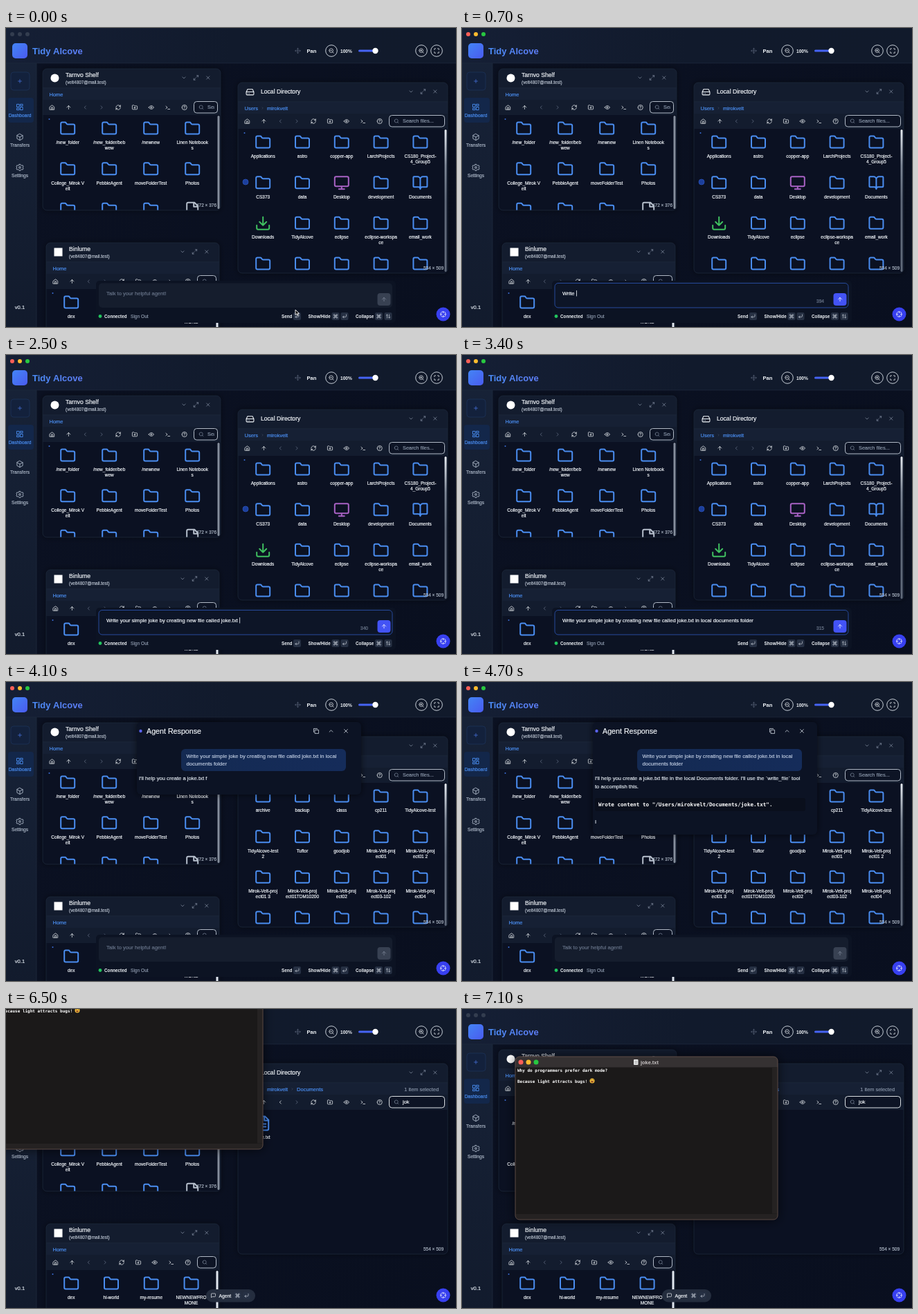
These frames come from a looping animation (650 px wide and 433 px high, 7.2 s). An HTML page with a canvas:

```html
<!DOCTYPE html>
<html lang="en">
<head>
<meta charset="utf-8">
<title>File dashboard</title>
<style>
  html, body { margin: 0; width: 100%; height: 100%; overflow: hidden; background: #0a1020; }
  canvas { display: block; width: 650px; height: 433px; }
</style>
</head>
<body>
<canvas id="stage"></canvas>
<script>
const W = 650, H = 433, LOOP = 7200;
const canvas = document.getElementById('stage');
const dpr = window.devicePixelRatio || 1;
canvas.width = W * dpr;
canvas.height = H * dpr;
const c = canvas.getContext('2d');

const SANS = '"Liberation Sans", Arial, sans-serif';
const MONO = '"DejaVu Sans Mono", monospace';
const BLUE = '#4a8df0', WHITE = '#f1f5f9', GRAY = '#8793a6', DIM = '#566176';

// Icons on a 24 unit grid
const ring = 'M2 12a10 10 0 1 0 20 0 10 10 0 1 0-20 0';
const lens = 'M3 11a8 8 0 1 0 16 0 8 8 0 1 0-16 0M21 21l-4.3-4.3';
const folder = 'M20 20a2 2 0 0 0 2-2V8a2 2 0 0 0-2-2h-7.9a2 2 0 0 1-1.7-.9L9.6 3.9A2 2 0 0 0 7.9 3H4a2 2 0 0 0-2 2v13a2 2 0 0 0 2 2Z';
const sheet = 'M15 2H6a2 2 0 0 0-2 2v16a2 2 0 0 0 2 2h12a2 2 0 0 0 2-2V7ZM14 2v6h6';
const icons = {
  folder, lens, sheet,
  home: 'M3 10l9-7 9 7v11H3zM9 21v-9h6v9',
  up: 'M5 12l7-7 7 7M12 19V5',
  left: 'M15 18l-6-6 6-6',
  right: 'M9 18l6-6-6-6',
  refresh: 'M3 12a9 9 0 0 1 15-6.7L21 8M21 3v5h-5M21 12a9 9 0 0 1-15 6.7L3 16M3 21v-5h5',
  addFolder: folder + 'M12 10v6M9 13h6',
  eye: 'M2 12c5-9 15-9 20 0-5 9-15 9-20 0ZM9 12a3 3 0 1 0 6 0 3 3 0 1 0-6 0',
  shell: 'M4 17l6-5-6-5M12 19h8',
  help: ring + 'M9 9a3 3 0 0 1 6 1c0 2-3 3-3 3M12 17h.01',
  zoomOut: lens + 'M8 11h6',
  zoomIn: lens + 'M8 11h6M11 8v6',
  corners: 'M8 3H3v5M16 3h5v5M8 21H3v-5M16 21h5v-5',
  expand: 'M15 3h6v6M9 21H3v-6M21 3l-7 7M3 21l7-7',
  down: 'M6 9l6 6 6-6',
  chevronUp: 'M18 15l-6-6-6 6',
  close: 'M18 6L6 18M6 6l12 12',
  drive: 'M22 12H2M5.5 5L2 12v6a2 2 0 0 0 2 2h16a2 2 0 0 0 2-2v-6l-3.5-7ZM6 16h.01M10 16h.01',
  move: 'M12 2v20M2 12h20M9 5l3-3 3 3M9 19l3 3 3-3M5 9l-3 3 3 3M19 9l3 3-3 3',
  board: 'M3 3h7v9H3zM14 3h7v5h-7zM14 12h7v9h-7zM3 16h7v5H3z',
  box: 'M12 2l9 5v10l-9 5-9-5V7zM3 7l9 5 9-5M12 22V12',
  gear: 'M10 2h4l1 3 3 1 3-1 2 4-2 3 2 3-2 4-3-1-3 1-1 3h-4l-1-3-3-1-3 1-2-4 2-3-2-3 2-4 3 1 3-1ZM9 12a3 3 0 1 0 6 0 3 3 0 1 0-6 0',
  plus: 'M5 12h14M12 5v14',
  monitor: 'M4 3h16a2 2 0 0 1 2 2v10a2 2 0 0 1-2 2H4a2 2 0 0 1-2-2V5a2 2 0 0 1 2-2ZM8 21h8M12 17v4',
  book: 'M12 7v14M3 18a1 1 0 0 1-1-1V4a1 1 0 0 1 1-1h5a4 4 0 0 1 4 4 4 4 0 0 1 4-4h5a1 1 0 0 1 1 1v13a1 1 0 0 1-1 1h-6a3 3 0 0 0-3 3 3 3 0 0 0-3-3z',
  download: 'M21 15v4a2 2 0 0 1-2 2H5a2 2 0 0 1-2-2v-4M7 10l5 5 5-5M12 15V3',
  file: sheet + 'M8 9h2M8 13h8M8 17h8',
  chat: 'M21 15a2 2 0 0 1-2 2H7l-4 4V5a2 2 0 0 1 2-2h14a2 2 0 0 1 2 2z',
  target: ring + 'M22 12h-5M7 12H2M12 7V2M12 22v-5',
  cmd: 'M15 6v12a3 3 0 1 0 3-3H6a3 3 0 1 0 3 3V6a3 3 0 1 0-3 3h12a3 3 0 1 0-3-3',
  enter: 'M9 10l-5 5 5 5M20 4v7a4 4 0 0 1-4 4H4',
  upDown: 'M7 20V4M3 8l4-4 4 4M17 4v16M13 16l4 4 4-4',
  copy: 'M8 8h13v13H8zM4 16H3V3h13v1',
  arrow: 'M0 0v15l3.5-3.3 2.3 5.3 2.6-1.1-2.3-5.2h4.9Z',
  hand: 'M5 12V7q2-2 3 0V5q2-2 3 0V4q2-2 3 0v2q2-2 3 0v9q0 6-6 6-4 0-6-4l-3-4q1-2 3-1Z'
};
for (const name in icons) icons[name] = new Path2D(icons[name]);

const ACCOUNT = '(velt4807@mail.test)', USER = 'mirokvelt';
const project = s => 'Mirok-Velt-proj|ect' + s;
const blanks = n => Array(n).fill('');
const SHELF = ['/new_folder', '/new_folder/beb|wew', '/newnew', 'Linen Notebook|s',
  'College_Mirok V|elt', 'PebbleAgent', 'moveFolderTest', 'Photos', '', '', '', 'sheet:'];
const BIN = ['dex', 'hi-world', 'my-resume', 'NEWNEWFRO|MONE'];
const HOME = ['Applications', 'astro', 'copper-app', 'LarchProjects', 'CS180_Project-|4_Group5',
  'CS373', 'data', 'monitor:Desktop', 'development', 'book:Documents',
  'download:Downloads', 'TidyAlcove', 'eclipse', 'eclipse-workspa|ce', 'email_work', ...blanks(5)];
const DOCS = ['archive', 'backup', 'class', 'cp211', 'TidyAlcove-test',
  'TidyAlcove-test|2', 'Tuftor', 'goodjob', project('01'), project('01 2'),
  ...['01 3', '01TDM10200', '02', '03-102', '04'].map(project), ...blanks(5)];
const TINT = { folder: BLUE, book: BLUE, file: BLUE, sheet: '#b6bfcc', monitor: '#a862c4', download: '#3fbf5f' };

const PROMPT = 'Write your simple joke by creating new file called joke.txt in local documents folder';
const ASK = ['Write your simple joke by creating new file called joke.txt in local', 'documents folder'];
const PLAN = ['I\'ll help you create a joke.txt file in the local Documents folder. I\'ll use the `write_file` tool', 'to accomplish this.'];
const DONE = ['I\'ve created the joke.txt file in your Documents folder with a lighthearted programmer',
  'joke. The file has been successfully written. Would you like me to show you the contents', 'of the file?'];

const clamp = (v, a, b) => Math.max(a, Math.min(b, v));

function rect(x, y, w, h, fill, r = 0, stroke, lw = 0.8) {
  c.beginPath();
  c.roundRect(x, y, w, h, r);
  if (fill) { c.fillStyle = fill; c.fill(); }
  if (stroke) { c.strokeStyle = stroke; c.lineWidth = lw; c.stroke(); }
}
function disc(x, y, r, fill, stroke, lw = 1) {
  rect(x - r, y - r, 2 * r, 2 * r, fill, r, stroke, lw);
}
// A hairline outline gives regular text a medium weight
function text(s, x, y, size, color = WHITE, { bold, align = 'left', font = SANS } = {}) {
  c.font = `${bold ? 'bold ' : ''}${size}px ${font}`;
  c.textAlign = align;
  c.fillStyle = c.strokeStyle = color;
  c.fillText(s, x, y);
  if (bold) return;
  c.lineWidth = 0.2;
  c.strokeText(s, x, y);
}
function icon(name, x, y, size, color = WHITE, weight = 2) {
  c.save();
  c.translate(x - size / 2, y - size / 2);
  c.scale(size / 24, size / 24);
  c.strokeStyle = color;
  c.lineWidth = weight;
  c.lineCap = c.lineJoin = 'round';
  c.stroke(icons[name]);
  c.restore();
}
function gradient(x0, y0, x1, y1, ...colors) {
  const g = c.createLinearGradient(x0, y0, x1, y1);
  colors.forEach((color, i) => g.addColorStop(i / (colors.length - 1), color));
  return g;
}
function lights(x, y, r, gap, on) {
  ['#ff5f57', '#febc2e', '#28c840'].forEach((color, i) => disc(x + i * gap, y, r, on ? color : '#333d4f'));
}
// Prints the first n characters of wrapped lines
function stream(lines, n, x, y, step, color) {
  lines.forEach((line, i) => {
    if (n > 0) text(line.slice(0, n), x, y + i * step, 7.65, color);
    n -= line.length;
  });
}

function chrome(active) {
  rect(0, 0, W, H, gradient(0, 50, W, H, '#0b1122', '#090f1f'));
  rect(0, 51, 44, 382, gradient(0, 51, 0, H, '#172237', '#121b2d'));
  rect(0, 0, W, 51, gradient(0, 0, W, 0, '#151f35', '#111a2c', '#111a2b'));
  rect(0, 50.5, W, 0.8, '#1e293c');
  rect(43.6, 51, 0.8, 382, '#202b3f');
  lights(9, 9, 3, 11, active);
  rect(9, 22, 22, 22, gradient(9, 22, 31, 44, '#4385f5', '#4a5bf0'), 5);
  text('Tidy Alcove', 38, 38, 13, gradient(38, 0, 116, 0, '#4a8cf7', '#5f7cf6'), { bold: true });

  icon('move', 421.5, 33, 9, DIM);
  text('Pan', 434.5, 36, 7.6, WHITE, { bold: true });
  for (const [x, name] of [[470, 'zoomOut'], [600, 'zoomIn'], [622, 'corners']]) {
    disc(x, 33, 8.3, '#101829', '#dbe2ea', 0.9);
    icon(name, x, 33, 8.5);
  }
  text('100%', 483, 35.7, 6.6, WHITE, { bold: true });
  rect(509, 31.5, 28, 3, '#4764f5', 1.5);
  disc(533.5, 33, 4.2, '#fff');

  rect(7, 64, 27, 26, '#13213c', 4, '#1d3358');
  icon('plus', 20, 77, 8.5, '#4a78e8');
  rect(3, 101, 37, 36, '#13274a', 4);
  [['board', 'Dashboard', 114.5, BLUE], ['box', 'Transfers', 158, '#a9b4c4'], ['gear', 'Settings', 202, '#a9b4c4']]
    .forEach(([name, label, y, color]) => {
      icon(name, 20, y, 11, color);
      text(label, 20, y + 14, 6.7, color, { align: 'center' });
    });
  text('v0.1', 20, 407, 7.6, '#dbe2ea', { align: 'center' });
}

function items(list, x, y, cols, pitch) {
  list.forEach((entry, i) => {
    const [, name = 'folder', label] = entry.match(/^(?:(\w+):)?(.*)$/);
    const cx = x + (i % cols) * pitch, cy = y + Math.floor(i / cols) * 58.6;
    icon(name, cx, cy, 24, TINT[name]);
    label.split('|').forEach((s, k) => text(s, cx, cy + 22.6 + k * 8, 6.5, WHITE, { align: 'center' }));
  });
}

const TOOLS = ['home', 'up', 'left', 'right', 'refresh', 'addFolder', 'eye', 'shell', 'help'];

function card(x, y, w, h, o) {
  const right = x + w;
  c.save();
  c.shadowColor = 'rgba(0,0,0,.5)';
  c.shadowBlur = 8;
  rect(x, y, w, h, '#0b1122', 6);
  c.restore();
  c.save();
  c.beginPath();
  c.roundRect(x, y, w, h, 6);
  c.clip();
  rect(x, y, w, 67, '#131c2e');
  rect(x, y + 28, w, 17, '#162034');
  rect(x, y + 27.6, w, 0.7, '#1f2a3d');

  if (o.mark) o.mark(x + 17.5, y + 13.5);
  text(o.title, x + 33, y + (o.account ? 12 : 16), 8.6);
  if (o.account) text(o.account, x + 33, y + 22, 6.4, '#b4bdca');
  ['down', 'expand', 'close'].forEach((n, i) => icon(n, right - 53 + i * 17.4, y + 13, 8.5, GRAY));

  let cx = x + 9.5;
  o.path.forEach((part, i) => {
    if (i) { icon('right', cx + 6.5, y + 37, 5, DIM); cx += 13; }
    text(part, cx, y + 39.8, 7.5, BLUE);
    cx += c.measureText(part).width;
  });
  if (o.note) text(o.note, right - 13, y + 39.5, 7.4, GRAY, { align: 'right' });

  TOOLS.forEach((n, i) => {
    const dim = n === 'right' || n === 'left' && o.path.length < 3;
    icon(n, x + 13.5 + i * 23.9, y + 56, 8.6, dim ? '#68748a' : WHITE);
  });
  rect(x + 218.5, y + 47.5, w - 223, 16.5, '#0d1425', 4, o.query ? '#f1f5f9' : '#c3ccd8', 0.9);
  icon('lens', x + 229, y + 55.8, 7.6, GRAY);
  c.save();
  c.beginPath();
  c.rect(x, y, w - 9, h);
  c.clip();
  if (w > 255) text(o.query || 'Search files...', x + 238, y + 58.4, 7.4, o.query ? WHITE : GRAY);
  c.restore();

  c.save();
  c.beginPath();
  c.rect(x, y + 67, w, h - 67);
  c.clip();
  items(o.list, x + 36.2, y + 86.6, o.cols, o.pitch);
  if (o.dot) disc(x + 11, y + 144, 4, '#1c3f9c', '#2b55bd', 0.8);
  if (o.list.length > 1) {
    disc(x + 9.5, y + 73, 1, '#3b6fd8');
    rect(right - 4.5, y + 68, 3, h - 70, o.bar, 1.5);
  }
  if (o.size) text(o.size, right - 6, y + h - 5.5, 6.5, '#aab4c2', { align: 'right' });
  c.restore();
  c.restore();
  rect(x, y, w, h, null, 6, '#1e293b', 0.8);
}

function keycap(name, x, y) {
  rect(x - 5.5, y - 5.5, 11, 11, '#263043', 2);
  icon(name, x, y, 7.5, '#d5dce5');
}

function composer(t) {
  const focused = t >= 300 && t < 3600;
  rect(130, 366, 433, 61, '#0c1323', 5);
  rect(134, 369.5, 424, 35.5, focused ? '#0d1527' : '#151d2d', 5, focused ? '#264a9c' : null, 1);
  const count = clamp(Math.floor((t - 500) * 0.03 + 1e-6), 0, PROMPT.length);
  const ready = focused && count > 0;
  if (ready) {
    const typed = PROMPT.slice(0, count);
    text(typed, 145, 386.8, 7.6);
    if (count < PROMPT.length) rect(145.4 + c.measureText(typed).width, 380, 0.8, 8.5, WHITE);
    text(400 - count, 512, 398, 6.6, '#6c788c');
  } else {
    text('Talk to your helpful agent!', 145, 386.8, 7.6, '#667287');
  }
  rect(536.5, 384, 19, 18, ready ? '#4353f5' : '#384152', 4);
  icon('up', 546, 393, 9, ready ? '#fff' : '#7f8a9b');

  disc(136, 417.5, 2.4, '#22c55e');
  text('Connected', 142, 420, 6.3, WHITE, { bold: true });
  text('Sign Out', 180, 420, 6.6, GRAY);
  text('Send', 398, 420, 6.3, WHITE, { bold: true });
  text('Show/Hide', 436.5, 420, 6.3, WHITE, { bold: true });
  text('Collapse', 505, 420, 6.3, WHITE, { bold: true });
  [['enter', 420.5], ['cmd', 476], ['enter', 489], ['cmd', 538.5], ['upDown', 552]]
    .forEach(([n, x]) => keycap(n, x, 417.5));
}

function agentPill() {
  rect(289, 406, 71, 18.5, '#242d3e', 9);
  icon('chat', 299.5, 415, 8);
  text('Agent', 307.5, 417.8, 6.8);
  keycap('cmd', 334.5, 415);
  keycap('enter', 347.5, 415);
}

function response(t) {
  const doneChars = t < 4600 ? 0 : 1 + Math.floor(Math.max(0, t - 4700) * 0.37);
  let bottom = 137;
  if (t >= 4000) bottom = 163;
  if (t >= 4400) bottom = 195;
  let left = doneChars, lines = 0;
  for (const s of DONE) if (left > 0) { lines++; left -= s.length; }
  if (lines) bottom = 209 + 12 * lines;

  c.save();
  c.shadowColor = 'rgba(0,0,0,.6)';
  c.shadowBlur = 10;
  rect(189, 58, 324, bottom - 58, '#0c1324', 6);
  c.restore();
  disc(194.5, 71, 2.2, '#5a63f0');
  text('Agent Response', 203, 75, 10.7);
  [['copy', 448], ['chevronUp', 469.5], ['close', 491]].forEach(([n, x]) => icon(n, x, 71, 9.5, '#d3dae4'));

  rect(253, 97, 238, 32, gradient(253, 0, 491, 0, '#142a52', '#152c5a'), 6);
  stream(ASK, 999, 260.5, 110, 11.3, '#b9c6dc');
  if (t >= 4000) stream(PLAN, (t - 3990) * 0.3, 192, 142.3, 12, '#dde4ec');
  if (t >= 4400) {
    rect(192, 168, 304, 19, '#0a0f1c', 3);
    text(`Wrote content to "/Users/${USER}/Documents/joke.txt".`, 197, 180, 7.6, '#fff', { bold: true, font: MONO });
  }
  stream(DONE, doneChars, 192, 205, 12, '#dde4ec');
}

function textWindow(t) {
  const k = clamp((t - 6500) / 500, 0, 1), e = k * k * (3 - 2 * k);
  c.save();
  c.translate(-8 + 85 * e, -33 + 102 * e);
  c.shadowColor = 'rgba(0,0,0,.7)';
  c.shadowBlur = 16;
  rect(0, 0, 379, 236, '#1b1919', 6);
  c.shadowBlur = 0;
  rect(0, 0, 379, 15.5, '#353132', [6, 6, 0, 0]);
  rect(371, 15.5, 7.5, 212, '#252222');
  rect(0.5, 228, 378, 7.5, '#252222', [0, 0, 6, 6]);
  rect(0, 0, 379, 236, null, 6, '#65524b', 0.9);
  lights(8, 8, 3.5, 11, true);
  rect(171, 4, 6.5, 8, '#e8e8e8', 1);
  for (let i = 0; i < 3; i++) rect(172.3, 6 + i * 1.8, 4, 0.6, '#8a8a8a');
  text('joke.txt', 181, 10.6, 7.4, '#c9c5c5', { bold: true });
  const mono = { bold: true, font: MONO };
  text('Why do programmers prefer dark mode?', 3, 21.5, 6, '#fff', mono);
  text('Because light attracts bugs!', 3, 37.5, 6, '#fff', mono);
  disc(111, 35, 3.5, '#f6c23e');
  rect(108.8, 33.2, 1.4, 0.9, '#5a3a12');
  rect(111.8, 33.2, 1.4, 0.9, '#5a3a12');
  rect(109, 35.4, 4, 1.9, '#7a2d1c', [0, 0, 2, 2]);
  c.restore();
}

function pointer(t) {
  // [time, x, y] stops
  const stops = t < 300 ? [[0, 418, 408], [300, 410, 392]]
    : [[5200, 560, 130], [5400, 535, 98], [5650, 491, 71], [5850, 590, 134], [6100, 590, 134], [6250, 372, 165], [6350, 372, 165]];
  const i = stops.findIndex(s => s[0] > t);
  if (i < 1) return;
  const [a, b] = [stops[i - 1], stops[i]], k = (t - a[0]) / (b[0] - a[0]);
  const hand = t >= 5200 && t < 5550;
  const shape = icons[hand ? 'hand' : 'arrow'];
  c.save();
  c.translate(a[1] + (b[1] - a[1]) * k, a[2] + (b[2] - a[2]) * k);
  if (hand) c.translate(-5, -6);
  c.scale(0.5, 0.5);
  c.fillStyle = hand ? '#fff' : '#111';
  c.strokeStyle = hand ? '#111' : '#fff';
  c.lineWidth = 1.8;
  c.fill(shape);
  c.stroke(shape);
  c.restore();
}

function draw(t) {
  c.setTransform(dpr, 0, 0, dpr, 0, 0);
  const inDocs = t >= 4000, collapsed = t >= 5700;
  const query = 'jok'.slice(0, clamp(Math.floor((t - 5800) / 100), 0, 3));

  chrome(t >= 200 && t < 6350);
  card(53, 59, 257, 205, {
    title: 'Tarnvo Shelf', account: ACCOUNT, path: ['Home'], list: SHELF, cols: 4, pitch: 60,
    size: '472 × 376', bar: '#858e9c', mark: (x, y) => disc(x, y, 6, '#fff')
  });
  card(335, 79, 303, 276, {
    title: 'Local Directory', cols: 5, pitch: 56.8, size: '554 × 509', query,
    path: inDocs ? ['Users', USER, 'Documents'] : ['Users', USER],
    list: query ? ['file:joke.txt'] : inDocs ? DOCS : HOME,
    note: t >= 6250 && '1 item selected', dot: !inDocs,
    bar: gradient(0, 147, 0, 354, '#e6ebf1', '#7d8796', '#5f6979', '#5f6979', '#5f6979'),
    mark: (x, y) => icon('drive', x, y, 13)
  });
  card(58, 311, 250, 140, {
    title: 'Binlume', account: ACCOUNT, path: ['Home'], list: BIN, cols: 4, pitch: 57.8,
    bar: '#e2e8f0', mark: (x, y) => rect(x - 6, y - 6, 12, 12, '#fff')
  });
  disc(631.5, 414.5, 10, '#3840f0');
  icon('target', 631.5, 414.5, 9);

  if (collapsed) agentPill(); else composer(t);
  if (t >= 3600 && !collapsed) response(t);
  if (t >= 6350) textWindow(t);
  pointer(t);
}

function tick(now) {
  draw(Math.floor((now % LOOP) / 100) * 100);
  requestAnimationFrame(tick);
}
requestAnimationFrame(tick);
</script>
</body>
</html>
```
